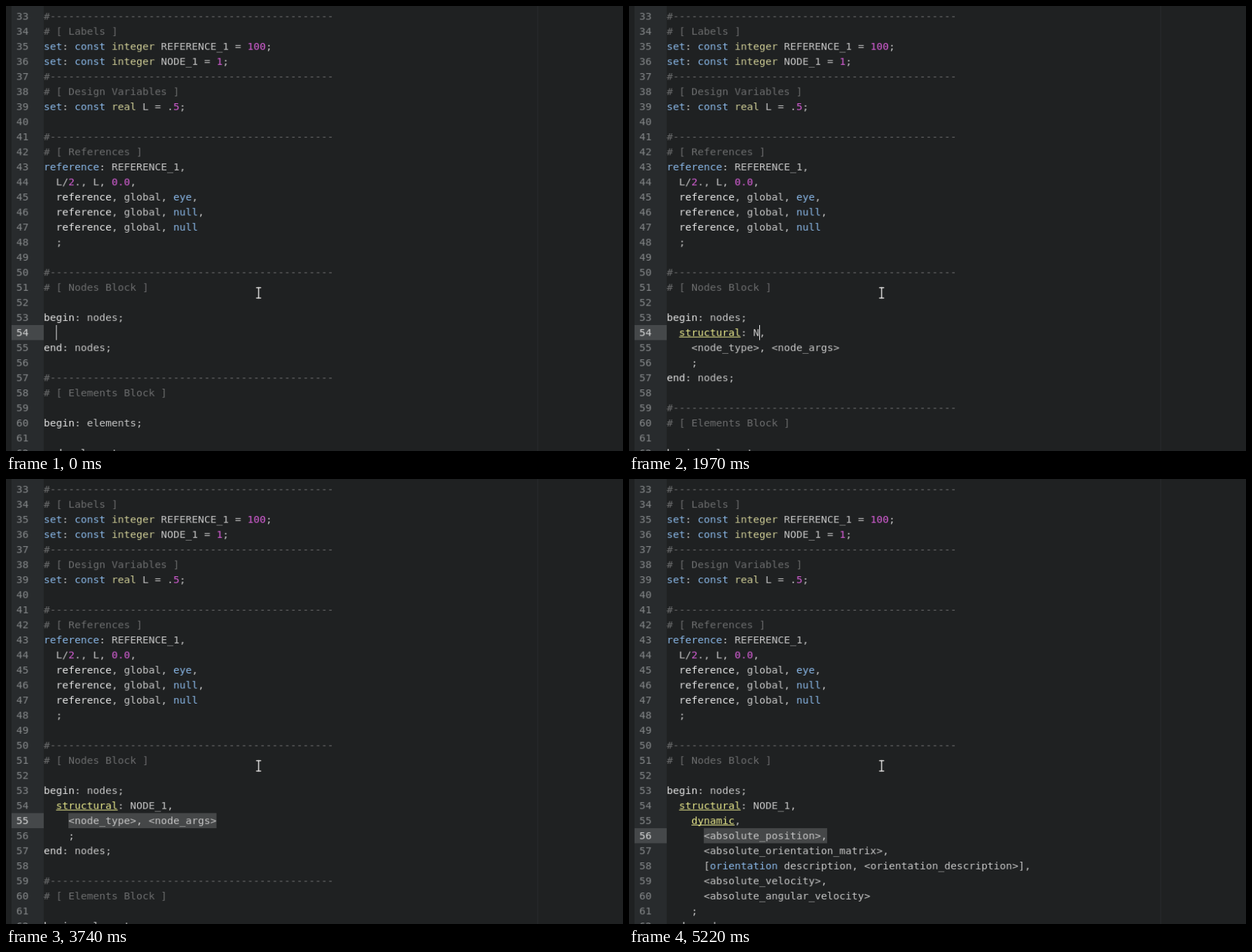
An HTML page with a canvas that plays this animation: 881x636 px, repeating every 8000 ms.

```html
<!DOCTYPE html>
<html lang="en">
<head>
<meta charset="utf-8">
<title>Code editor with completions</title>
<style>
html, body { margin: 0; width: 100%; height: 100%; overflow: hidden; background: #1f2122; }
canvas { display: block; width: 881px; height: 636px; }
</style>
</head>
<body>
<canvas id="stage" width="900" height="650"></canvas>
<script>
// The editor is laid out on a 900 x 650 pixel grid and shown slightly reduced.
const ctx = document.getElementById('stage').getContext('2d');
const LOOP = 8000, LEFT = 55, CHAR = 9, TOP = 4, LINE = 22, BASE = 16, FIRST = 33, ROW = 30;
const MONO = '"DejaVu Sans Mono", monospace';
const CODE = '14.95px ' + MONO, BOLD = 'bold ' + CODE, HINT = '13.29px ' + MONO;
const NOTE = '13.33px Roboto, sans-serif';
const C = {
  bg: '#1f2122', gutter: '#282b2d', active: '#45484a', ruler: '#2b2d2f',
  number: '#85888a', comment: '#6c6d6e', plain: '#c6c6c6', white: '#e6e6e6',
  blue: '#8ab8e8', type: '#cfcd96', digit: '#d75fd7', call: '#e8e88c',
  select: '#454748', popup: '#1b1c1d', row: '#323435', foot: '#0f1011'
};

const rule = '#' + '-'.repeat(46);
const head = [
  rule, '# [ Labels ]',
  'set: const integer REFERENCE_1 = 100;',
  'set: const integer NODE_1 = 1;',
  rule, '# [ Design Variables ]',
  'set: const real L = .5;', '',
  rule, '# [ References ]',
  'reference: REFERENCE_1,', '  L/2., L, 0.0,',
  '  reference, global, eye,', '  reference, global, null,', '  reference, global, null',
  '  ;', '',
  rule, '# [ Nodes Block ]', '', 'begin: nodes;'
];
const tail = ['end: nodes;', '', rule, '# [ Elements Block ]', '', 'begin: elements;', '', 'end: elements;'];
const args = '    <node_type>, <node_args>';
const named = '  structural: NODE_1,';
const expanded = [
  named, '    dynamic,', '      <absolute_position>,', '      <absolute_orientation_matrix>,',
  '      [orientation description, <orientation_description>],',
  '      <absolute_velocity>,', '      <absolute_angular_velocity>', '    ;'
];

// Popup rows are [label, hint].
const strRow = ['structural:', 'node-structural'];
const dynRow = ['dynamic', 'node-structural-dynamic'];
const nodeRows = ['NODE_1', 'node_type', 'node_args', 'nodes', 'Nodes'].map(s => [s]);
const strList = (match, rows, right) =>
  ({ x: 33, right, line: 54, match, rows, icon: true, foot: 'Structural node' });
const nodeList = (match, extra) =>
  ({ x: 172, right: 373, line: 54, match, rows: nodeRows, extra });
const dynList = (match, rows) =>
  ({ x: 51, right: 368, line: 55, match, rows, icon: true, foot: 'Dynamic structural node' });

const sList = strList(1, [strRow, ['structural'], ['set'], ['spherical hinge:', 'joint-spherical-hinge']], 415);
const stList = strList(2, [strRow, ['structural']], 324);
const fullList = strList(3, [strRow, ['structural']], 324);
const dList = dynList(1, [dynRow, ['Design'], ['displacement']]);

const word = (text, popup, caret = true) =>
  ({ body: ['  ' + text], line: 54, caret: caret && 2 + text.length, popup });
const label = (text, popup, caret = true) =>
  ({ body: [`  structural: ${text},`, args, '    ;'], line: 54, caret: caret && 14 + text.length, popup });
const kind = (text, popup) =>
  ({ body: [named, '    ' + text, '    ;'], line: 55, caret: 4 + text.length, popup });

const steps = [
  [0, word('')],
  [370, word('s')],
  [430, word('s', sList)],
  [490, word('st', sList)],
  [550, word('st', stList)],
  [610, word('str', stList)],
  [670, word('str', fullList)],
  [1080, word('str', fullList, false)],
  [1230, { ...label('<node_label>', null, false), select: [14, 26] }],
  [1970, label('N')],
  [2100, label('NO')],
  [2150, label('NO', nodeList(2))],
  [2230, label('NOD', nodeList(2))],
  [2300, label('NODE', nodeList(3))],
  [2380, label('NODE', nodeList(4))],
  [2680, label('NODE_', nodeList(4))],
  [2730, label('NODE_', nodeList(5, true))],
  [3020, label('NODE_1', nodeList(5, true))],
  [3070, label('NODE_1')],
  [3510, label('NODE_1', null, false)],
  [3740, { body: [named, args, '    ;'], line: 55, caret: false, select: [4, 28] }],
  [4520, kind('d')],
  [4620, kind('d', dList)],
  [4700, kind('dy', dList)],
  [4780, kind('dyn', dList)],
  [4860, kind('dyn', dynList(3, [dynRow]))],
  [5220, { body: expanded, line: 56, caret: false, select: [6, 26] }]
];

const colX = col => LEFT + col * CHAR;
const lineY = n => TOP + (n - FIRST) * LINE;

function box(x, y, w, h, color) {
  ctx.fillStyle = color;
  ctx.fillRect(x, y, w, h);
}

function text(s, x, y, color, font = CODE) {
  ctx.font = font;
  ctx.fillStyle = color;
  ctx.fillText(s, x, y);
}

function tokenColor(token, next) {
  if (/^(set|const|eye|null|orientation)$/.test(token)) return C.blue;
  if (token === 'reference') return next === ':' ? C.blue : C.white;
  if (/^(begin|end)$/.test(token)) return C.white;
  if (/^(integer|real)$/.test(token)) return C.type;
  if (/^(structural|dynamic)$/.test(token)) return C.call;
  return /^\d/.test(token) ? C.digit : C.plain;
}

function codeLine(s, n) {
  const y = lineY(n) + BASE;
  if (s[0] === '#') return text(s, LEFT, y, C.comment);
  for (const m of s.matchAll(/[A-Za-z_]\w*|\d+(\.\d+)?|[^\w\s]+/g)) {
    const color = tokenColor(m[0], s[m.index + m[0].length]), x = colX(m.index);
    text(m[0], x, y, color);
    if (color === C.call) box(x, y + 1, m[0].length * CHAR, 1, color);
  }
}

function arrowIcon(x, y) {
  box(x + 6, y - 1, 6, 2, '#a5dba5');
  ctx.beginPath();
  ctx.moveTo(x + 11, y - 5);
  ctx.lineTo(x + 17, y);
  ctx.lineTo(x + 11, y + 5);
  ctx.fill();
  box(x + 19, y - 5, 2, 10, '#a5dba5');
}

function drawPopup(p) {
  const y = lineY(p.line + 1), w = p.right - p.x;
  const rowsH = (p.rows.length + (p.extra ? 1 : 0)) * ROW;
  const h = rowsH + (p.foot ? ROW : 0);
  ctx.save();
  ctx.shadowColor = 'rgba(0,0,0,.5)';
  ctx.shadowBlur = 5;
  ctx.shadowOffsetY = 1;
  ctx.fillStyle = C.popup;
  ctx.beginPath();
  ctx.roundRect(p.x, y, w, h, 3);
  ctx.fill();
  ctx.restore();
  box(p.x, y, w, ROW, C.row);
  if (p.icon) {
    box(p.x, y, 29, ROW, '#4b4c37');
    arrowIcon(p.x, y + 15);
  }
  const tx = p.x + (p.icon ? 40 : 9);
  p.rows.forEach(([name, hint], i) => {
    const ty = y + i * ROW + 20;
    const cut = /^node_/i.test(name) ? p.match : Math.min(p.match, 4);
    text(name.slice(0, cut), tx, ty, '#f2f2f2', BOLD);
    text(name.slice(cut), tx + cut * CHAR, ty, i ? '#a2a3a3' : '#bcbdbd');
    if (hint) text(hint, tx + name.length * CHAR + 16, ty - 1, '#858787', HINT);
  });
  if (p.foot) {
    box(p.x, y + rowsH, w, ROW, C.foot);
    text(p.foot, p.x + 8, y + rowsH + 19, '#b4b5b5', NOTE);
  }
}

// Pointer as three bars, grown by an outline margin.
function beam(color, m) {
  for (const [x, y, w, h] of [[365, 411, 7, 1], [368, 411, 1, 16], [365, 426, 7, 1]]) {
    box(x - m, y - m, w + 2 * m, h + 2 * m, color);
  }
}

function draw(s) {
  box(0, 0, 900, 650, C.bg);
  box(8, 0, 47, 650, C.gutter);
  box(775, 0, 1, 650, C.ruler);
  const y = lineY(s.line);
  box(8, y, 47, LINE, C.active);
  if (s.select) box(colX(s.select[0]), y, (s.select[1] - s.select[0]) * CHAR, LINE, C.select);

  const lines = [...head, ...s.body, ...tail];
  for (let n = FIRST; n <= 62; n++) {
    text(String(n), 15, lineY(n) + BASE, n === s.line ? '#d6d7d7' : C.number);
    codeLine(lines[n - FIRST] || '', n);
  }
  if (s.caret !== false) box(colX(s.caret), y, 1, LINE, '#f0f0f0');
  if (s.popup) drawPopup(s.popup);
  beam('#111', 1);
  beam('#f4f4f4', 0.25);
}

function frame(now) {
  const t = now % LOOP;
  draw(steps.findLast(([at]) => at <= t)[1]);
  requestAnimationFrame(frame);
}
draw(steps[0][1]);
requestAnimationFrame(frame);
</script>
</body>
</html>
```
